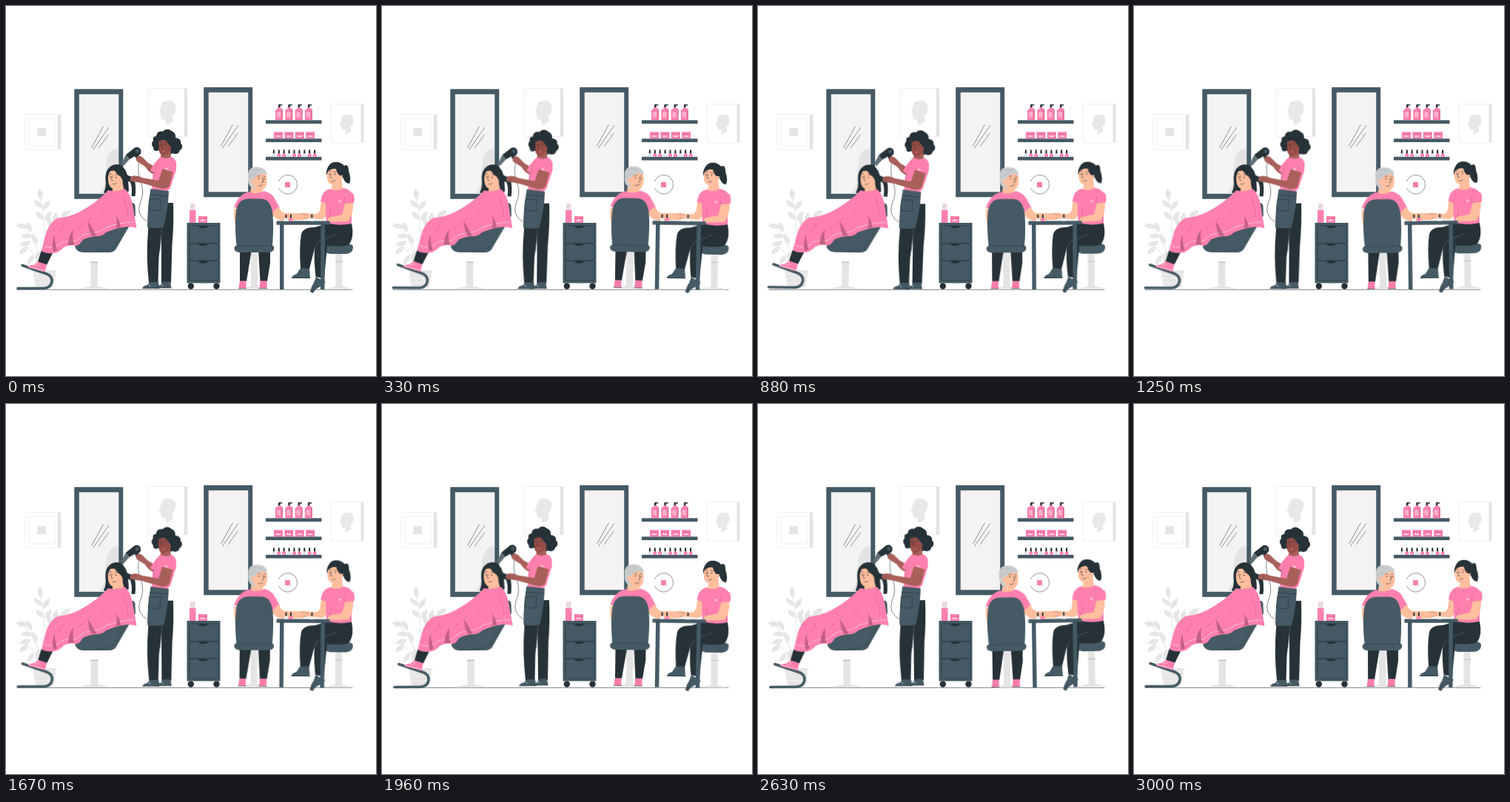
Animation of 500x500 px, one loop 3.04 s. Source, as an HTML page:

```html
<!DOCTYPE html>
<html lang="en">
<head>
<meta charset="utf-8">
<title>Beauty salon</title>
<style>
html, body { margin: 0; width: 100%; height: 100%; overflow: hidden; background: #fff; }
svg { display: block; width: 100vw; height: 100vh; }
.sway { animation: sway 3040ms linear infinite; }
#hair { transform-origin: 126.5px 274.5px; }
#nails { transform-origin: 389px 299px; animation-duration: 1520ms; }
@keyframes sway {
  0%, 100% { transform: rotate(0deg); }
  25% { transform: rotate(1deg); }
  75% { transform: rotate(-1deg); }
}
.slate { fill: #455a64; }
.dark { fill: #263238; }
.pink { fill: #ff80ae; }
.fold { fill: #b85a7c; }
.skin { fill: #ffbe9d; }
.brown { fill: #a9605a; }
.pale { fill: #f3f3f3; }
.grey { fill: #e4e4e4; }
.white { fill: #fff; }
.ink { fill: none; stroke: #263238; stroke-width: .6; stroke-linecap: round; stroke-linejoin: round; }
.edge { fill: #fff; stroke: #ebebeb; stroke-width: .8; }
.seam { fill: none; stroke: #fff; stroke-width: .6; }
</style>
</head>
<body>
<svg viewBox="0 0 500 500" xmlns="http://www.w3.org/2000/svg">
<defs>
  <path id="leaf" d="M0 0Q7-7 0-16Q-7-7 0 0"/>
  <g id="mirror">
    <path class="slate" d="M0 0H66V148.500H0Z"/>
    <path class="pale" d="M6.500 7H60V141.500H6.500Z"/>
    <path class="ink" d="M23.500 79L39 51M25.500 82L46.500 52M33 80L46 62" style="stroke-width:.5"/>
  </g>
  <path id="bust" d="M3 7Q5 0 13 1Q23 1 23 10Q23 17 18 22L19 28Q14 34 9 33L9 26Q3 28 3 23L2 19L0 17Q3 12 3 7Z" fill="#e8e8e8"/>
  <g id="bottle">
    <path class="dark" d="M4 5V1Q6 0 9.500 1V2.300H6.500V5Z"/>
    <path class="pink" d="M3 5H8V7H10V22H0V8L3 7Z"/>
    <path class="white" d="M2 11H7V18H2Z" opacity=".4"/>
    <path class="fold" d="M8.500 7H10V22H8.500Z" opacity=".45"/>
  </g>
  <g id="jar">
    <path class="pink" d="M0 0H12V9H0Z"/>
    <path class="fold" d="M0 2.500H12V3.400H0Z" opacity=".6"/>
    <path class="white" d="M2.500 4.800H9V6.800H2.500Z" opacity=".6"/>
  </g>
  <g id="polish">
    <path class="dark" d="M1.500 0H3.300L3.600 5H1.200Z"/>
    <path d="M1 5H4L4.900 6.500V9.500H0V6.500Z"/>
  </g>
  <path id="shelf" class="slate" d="M351 0H426.500V4.700H351Z"/>
</defs>

<!-- room -->
<path class="edge" d="M26 146.500H70V194H26ZM31 152H66V189H31Z"/>
<path class="grey" d="M70 146.500H74.500V194H70ZM42.500 165H54V176H42.500Z"/>
<path class="edge" d="M192.500 111.500H241V176.500H192.500Z"/>
<path class="grey" d="M241 111.500H245.500V176.500H241Z"/>
<use href="#bust" x="206.500" y="127"/>
<path class="edge" d="M439.500 132.500H480V185H439.500Z"/>
<path class="grey" d="M480 132.500H483.500V185H480Z"/>
<use href="#bust" transform="translate(451 146) scale(.81)"/>

<use href="#mirror" x="92.300" y="112.200"/>
<path class="grey" d="M126 253.500Q136 243 135 220Q136 192 152 192V253.500Z"/>
<use href="#mirror" x="267.200" y="109.700"/>

<use href="#shelf" y="154.200"/><use href="#shelf" y="179.200"/><use href="#shelf" y="203.700"/>
<g id="stock"></g>

<path class="ink" d="M368.600 237A12.800 12.800 0 1 1 369 246.500" style="stroke-width:.5"/>
<path class="pink" d="M377 238H384V245H377Z"/>

<g fill="#e6e6e6">
  <g id="plant"></g>
  <path d="M36 357H68L64 380H40Z"/>
</g>
<path d="M37 362H67M38 368H66M39 374H65" stroke="#f5f5f5" stroke-width=".8"/>

<path class="ink" d="M15 383.300H468"/>

<!-- cabinet -->
<circle class="dark" cx="249.800" cy="378.500" r="4.200"/>
<circle class="dark" cx="284.500" cy="378.500" r="4.200"/>
<path class="slate" d="M244.500 293H289.500V374.500H244.500Z"/>
<path class="ink" d="M248 297H287V320H248ZM248 321.500H287V343.500H248ZM248 345H287V371H248Z"/>
<path class="dark" d="M260 297H273L271 300H262ZM260 321H273L271 324H262ZM260 344.500H273L271 347.500H262Z"/>
<path d="M249 267H255.500V276H249Z" fill="#ead9df"/>
<path class="pink" d="M248 276H256.500V293H248Z"/>
<use href="#jar" x="260" y="284"/>

<!-- hairdresser and client -->
<g id="hair" class="sway">
  <path class="grey" d="M114.500 345H124V379Q131 380 141 382.500H97Q107 380 114.500 379Z"/>
  <path d="M114 346.500H124.500" stroke="#bbb"/>
  <path class="slate" d="M93 325L103 317L112 300L158 290L166 268Q173 263 174.500 270L175 283L150 326Q147 333 140 333H104Q95 332 93 325Z"/>
  <path class="ink" d="M123 331Q146 331 151 318L158 302" opacity=".5"/>
  <path d="M22 350.500L55 362Q63 365 62 373Q60 381.500 50 381.500H16" fill="none" stroke="#455a64" stroke-width="3.600" stroke-linecap="round"/>
  <path class="dark" d="M47.500 331L63 334L55 350L43 346Z"/>
  <path class="pink" d="M43 345.500L55 349.500L52.500 359.500L29 353Q31 350 37 350Z"/>
  <path class="seam" d="M30 352L52 358M39 349L41 352M42 347L44 351"/>

  <!-- client -->
  <path class="dark" d="M138 220Q144 212 154 214.500Q163 219 165 234L166 250L158 256L141 257L132 252Q136 244 134.500 234Q134 225 138 220Z"/>
  <path class="skin" d="M146 241L157 236L160 251L150 257L143 252Z"/>
  <path class="skin" d="M141 223Q149 221 154 228Q161 230 158 236Q157 245 149 248Q142 248 139 241Q136 230 141 223Z"/>
  <path class="dark" d="M138 225Q144 212 155 216Q163 222 162 236L158 243Q159 234 154 230Q148 226 146 220Q143 221 138 225Z"/>
  <path class="ink" d="M143.500 229.500L142.500 235L144.500 236M144 240.500Q147 242 149 239.500M140 227.500L142.500 227M147.500 227.500L151 228.500"/>
  <circle class="dark" cx="141" cy="231" r=".8"/><circle class="dark" cx="148.500" cy="231.500" r=".8"/>
  <path class="pink" d="M138 249Q149 252 160 247Q169 253 172 274L176.500 300Q166 297 158 299Q150 300 135 306Q130 312 121 311Q112 312 103 316Q101 323 94 324Q86 322 78 326Q72 333 64 334Q54 335 48 331Q51 317 55 304Q60 292 69 287Q85 285 98 279Q124 265 138 249Z"/>
  <path class="seam" d="M52 325Q66 329 75 320Q86 316 94 318Q100 312 107 308Q128 306 134 300Q154 292 174 292" stroke-dasharray="4 1"/>
  <path class="fold" d="M64 332Q61 321 66 309Q65 317 69 330ZM84 323Q84 311 91 302Q89 312 92 323ZM116 311Q111 303 111 291Q116 299 122 310ZM148 300Q151 294 149 283Q154 291 155 299Z" opacity=".85"/>
  <path d="M69 310L80 294M97 302L116 286M135 286L128 276M158 257Q164 272 165 285" fill="none" stroke="#d36990" stroke-width=".7"/>

  <!-- hairdresser -->
  <path class="dark" d="M194 266H226Q227 296 224.500 322L223 374H210V334L210 310L206.500 340L205.500 374H193Q189 336 192 304Z"/>
  <path class="ink" d="M210.500 300L208.500 330" style="stroke:#607078"/>
  <path class="slate" d="M194 373H206L207 381.500H184Q185 378 191 377ZM211 372.500H222L223.500 381H200Q202 377.500 209 377Z"/>
  <path class="ink" d="M185 381.500H207M201 381H223"/>
  <path class="seam" d="M193 376L195 379M210 376L212 379"/>
  <path class="dark" d="M203 176Q204 168 212 169.500Q217 164 224 169Q230 172 229 178Q237 179 236 185Q241 191 235 195Q233 202 225 199L219 202L206 195Q199 198 199 191Q195 186 199 182Q198 176 203 176Z"/>
  <path class="brown" d="M212 194L222 192L223 206Q216 211 208 206Z"/>
  <path class="pink" d="M209 204Q218 208 225 204Q231 209 230 221L222 246L218 250L219 267H196L198 246Q197 228 201 218Q203 209 209 204Z"/>
  <path d="M206.500 182Q214 176 222 182L223 193Q219 202 212 202.500Q207 201 206.500 193Z" fill="#964d46"/>
  <path class="dark" d="M203 184Q207 174 215 175Q225 176 225 191Q220 189 217 182Q212 179 203 184Z"/>
  <path class="ink" d="M211.500 185.500L210 191L212.500 192M208 183L210 183M215 183L218.500 184"/>
  <circle class="dark" cx="208.800" cy="186.500" r=".8"/><circle class="dark" cx="216" cy="187" r=".8"/>
  <path d="M210.500 196Q213 195 215.500 196Q213 198.500 210.500 196Z" fill="#c76b73"/>

  <path class="ink" d="M181 207Q176 222 182 237Q188 252 181 267Q176 282 190 291"/>
  <path class="brown" d="M204 218L199 227Q193 225 188 217L177 210Q174 205 177 203L184 204L192 212L199 216Z"/>
  <path class="pink" d="M208 205Q200 212 195 222L203 227L212 216Z"/>
  <path class="dark" d="M162 201L174 191.500Q179 189 182 194Q184 199 179 202L183 207Q181 211 178 209L174 203L167 207Z"/>
  <path d="M162 201L167 207L159 216L156.500 212Z" fill="#607078"/>
  <circle class="slate" cx="177.500" cy="196" r="2.500"/>
  <path class="brown" d="M177 203Q183 201 184 206L181 211Q177 211 176 207Z"/>

  <path class="slate" d="M195.500 247L220 250Q219 276 213 299Q202 301 191 299Q191 274 195.500 247Z"/>
  <path class="ink" d="M195 255L219 257M194 261H209L208 276Q200 278 193 275Z"/>
  <path class="ink" d="M207 206Q200 224 197 247" style="stroke:#d36990"/>
  <path class="dark" d="M158 223Q162 229 171 231L174 236Q176 246 174.500 257H169.500Q171 245 168 238Q162 235 160 234Z"/>
  <path class="brown" d="M227 220L221 243Q217 249 207 246L183 239L169 237Q166 233 170 230Q177 228 184 232L206 236L212 218Z"/>
  <path class="pink" d="M216 207Q226 201 230 211Q231 218 228 225L211 220Z"/>
  <path class="ink" d="M171 231L176 234M170 234L174 236" opacity=".5"/>
  <path class="seam" d="M215 220H219M216 218L218 222"/>
</g>

<!-- manicurist and client -->
<g id="nails" class="sway">
  <path class="grey" d="M445.500 334H454.500V379Q462 380 468 382.500H432Q439 380 445.500 379Z"/>
  <path d="M445 345.500H455" stroke="#bbb"/>
  <path class="slate" d="M429 325Q430 322 435 322H464Q469 322 469 326Q469 334 460 335H438Q429 334 429 325Z"/>

  <!-- manicurist -->
  <path class="slate" d="M398 354H410L411 368H386Q386 364 393 362ZM419 366L432 373L425 379Q418 382 415 388L411 386Q413 378 416 374Z"/>
  <path class="ink" d="M387 367.500H411M413 386L417 380"/>
  <path class="dark" d="M435 294H467Q471 311 464 322Q456 326 434 324L430 368L418.500 366Q416 345 417 328L410 355L398 354Q396 326 399 308Q402 299 417 299Z"/>
  <path class="ink" d="M417 330Q418 319 430 315L447 308" style="stroke:#607078"/>
  <path class="dark" d="M434 220Q438 209 449 211Q455 213 457 216Q463 212 463 223Q467 233 464 240Q458 240 455 231L450 237L436 230Q431 228 434 220Z"/>
  <path class="skin" d="M442 238L453 232L455 247Q447 253 439 248Z"/>
  <path class="skin" d="M436 221Q443 216 450 224Q458 225 454 232Q452 242 445 243Q436 242 434 234Q433 226 436 221Z"/>
  <path class="dark" d="M433 225Q437 211 447 213Q457 217 455 229L451 229Q447 226 446 220Q440 219 433 225Z"/>
  <path class="ink" d="M439.500 226L438 231.500L440.500 232.500M440 237Q443 238 445 235.500M436 224L438.500 223.500M443 224L446 225"/>
  <circle class="dark" cx="437" cy="227.500" r=".8"/><circle class="dark" cx="444.500" cy="227.500" r=".8"/>
  <path class="pink" d="M437 247Q447 252 456 246Q467 248 470 258L467 278L467 294Q450 298 433 293L431 270L427 263Q430 251 437 247Z"/>
  <path class="skin" d="M426 262L432 266L432 284Q430 290 422 288L400 287Q397 283 400 280L420 281L424 277Z"/>
  <path class="pink" d="M435 248Q427 251 425 264L435 268Z"/>
  <path class="skin" d="M458 267L469 265Q470 282 462 291L435 292V286L454 282Z"/>
  <path class="pink" d="M457 253L469 253Q472 259 470 266L457 267Z"/>
  <path d="M437 270Q441 278 436 287M457 257V267" fill="none" stroke="#d36990" stroke-width=".7"/>
  <path class="seam" d="M449 264H453M450 262L452 266"/>

  <!-- seated client -->
  <path class="grey" d="M331 333H340V379Q347 380 354 382.500H318Q324 380 331 379Z"/>
  <path class="dark" d="M316 329H332L325 372H316ZM341 329H357V347L353 372H343.500Z"/>
  <path class="pink" d="M316 371.500H324.500V381.500H314.500ZM343.500 371.500H352.500V381.500H342.500Z"/>
  <path class="seam" d="M315 374.500H324M314.500 378H324M343.500 374.500H353M343 378H353" style="stroke:#d36990"/>
  <path class="ink" d="M314.500 381.500H324.500M342.500 381.500H353"/>

  <!-- table -->
  <path class="slate" d="M365.500 290.500H437.500V295.500H431L430.500 383H425L425.500 295.500H375.500V383H370V295.500H365.500Z"/>
  <path class="ink" d="M366 295.500H437" opacity=".55"/>

  <path class="skin" d="M308.500 274H319V302L311 298Q307 289 308.500 274Z"/>
  <path class="skin" d="M332 239H346L347 253Q338 259 330 253Z"/>
  <path d="M327 230Q326 218 338 217.500Q350 217 352.500 226L350 239L338 248Q328 245 327 237Z" fill="#c9cccd"/>
  <path class="skin" d="M334 229Q343 222 351 226Q354 235 352 241Q350 249 343 249Q335 248 333 239Q329 237 331 233Q332 231 334 234Z"/>
  <path d="M328 231Q327 218 340 219Q351 219 352 229Q347 225 341 228Q337 230 334 235Z" fill="#c9cccd"/>
  <path class="ink" d="M328 224Q335 218 343 223M328 232Q332 227 338 227" style="stroke:#a9adaf"/>
  <path class="ink" d="M346.500 232L348 237.500L345.500 238.500M341 243Q345 244 347 241.500M340 230L343 229.500M348 230L350 230.500"/>
  <circle class="dark" cx="341.500" cy="233" r=".8"/><circle class="dark" cx="349" cy="233.500" r=".8"/>
  <path class="pink" d="M328 251Q338 256 349 250Q360 253 364 262L370 273L360 282V298H315L316 275L308 272Q314 255 328 251Z"/>
  <path class="skin" d="M359 280L368 271Q372 279 377 280L399 280Q405 278 411 282L410 286L402 289L373 290Q363 289 359 280Z"/>
  <path class="ink" d="M399 281Q404 283 409 282M402 287L407 286" opacity=".45"/>
  <path class="slate" d="M311.500 324Q309 300 310.500 281Q312 261 327 260.500H345Q358 261 360.500 281Q362 300 360 324Q363 324 362 329Q360 333 354 333H315Q308 332 308.500 327Q309 324 311.500 324Z"/>
  <path class="ink" d="M312 324H360" opacity=".6"/>

  <use href="#polish" x="376" y="281.500" fill="#ececec"/>
  <use href="#polish" x="382.500" y="281.500" fill="#ff80ae"/>
  <use href="#polish" x="411" y="281.500" fill="#ececec"/>
</g>
</svg>
<script>
const make = (parent, tag, attrs) => {
  const node = document.createElementNS("http://www.w3.org/2000/svg", tag);
  for (const key in attrs) node.setAttribute(key, attrs[key]);
  document.getElementById(parent).append(node);
};
const stock = (href, x, y, extra) => make("stock", "use", { href, x, y, ...extra });

for (let i = 0; i < 4; i++) {
  stock("#bottle", 364 + i * 13.3, 132.3);
  stock("#jar", 362 + i * 14.4, 170.2);
}
for (let i = 0; i < 9; i++) {
  stock("#polish", 359.5 + i * 6.9, 194.2, { fill: i % 3 ? "#ff80ae" : "#e2e2e2" });
}

make("plant", "path", {
  d: "M52 358Q54 300 47 258M52 352Q43 318 18 294M53 350Q55 306 82 278M52 356Q42 336 22 320",
  fill: "none", stroke: "#e6e6e6", "stroke-width": 1
});
// x, y, angle
const leaves = [
  [47, 262, -6], [49, 273, -46], [50, 276, 34], [51, 289, -44], [52, 290, 38],
  [65, 293, 12], [60, 299, -12], [74, 284, 62], [66, 291, 70], [59, 308, 58],
  [29, 299, -78], [35, 306, -28], [36, 311, -88], [42, 322, -24], [34, 319, -105],
  [30, 325, -130], [38, 336, -145], [44, 331, -170], [56, 326, 42]
];
for (const [x, y, angle] of leaves) {
  make("plant", "use", { href: "#leaf", transform: `translate(${x} ${y}) rotate(${angle})` });
}
</script>
</body>
</html>
```
